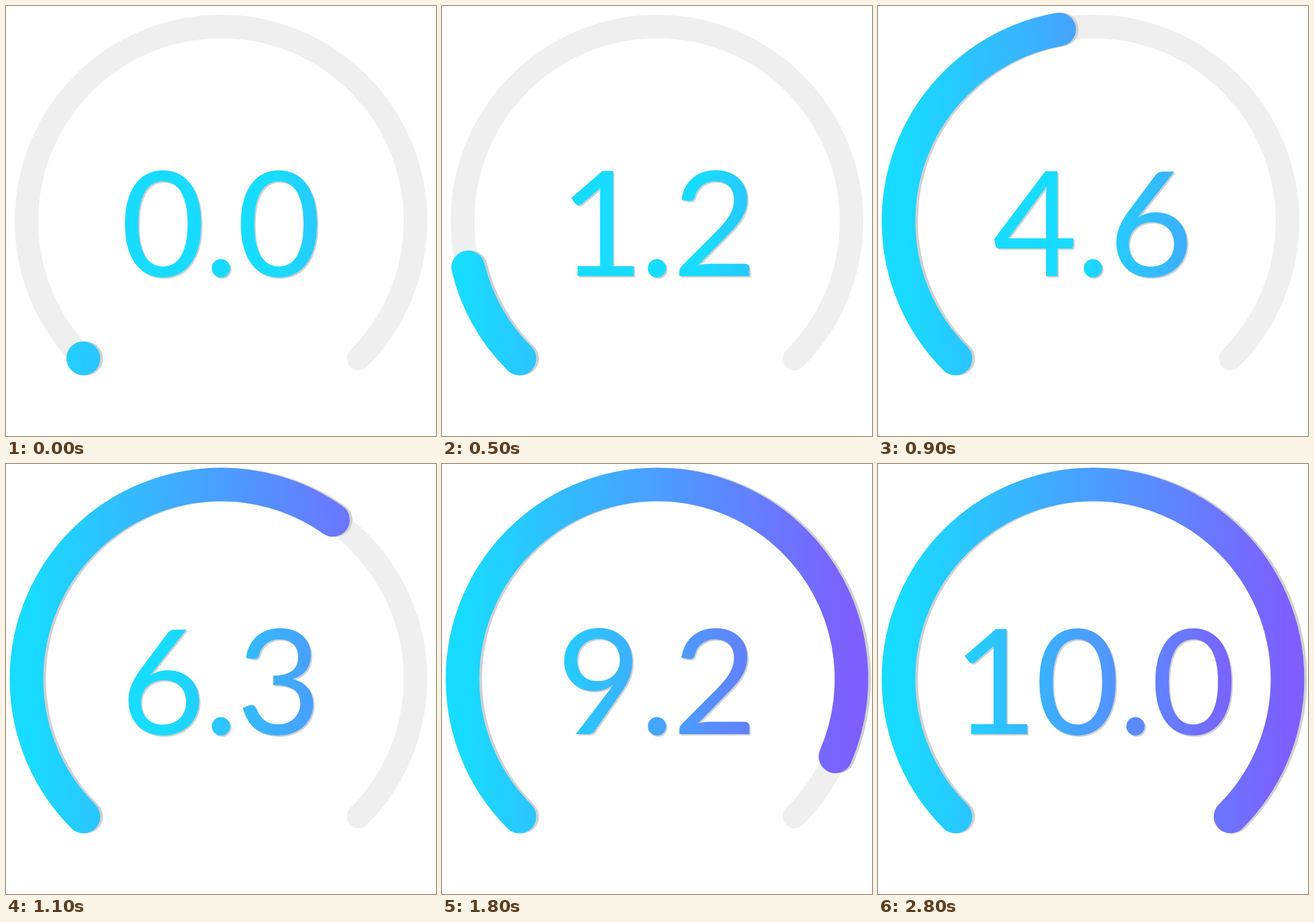
Write an HTML page with a canvas that moves like this. It is 640 px wide and 640 px high and loops after 3.9 s.

```html
<!DOCTYPE html>
<html lang="en">
<head>
<meta charset="utf-8">
<title>Score gauge</title>
<style>
  html, body { margin: 0; width: 100%; height: 100%; overflow: hidden; background: #fff; }
  canvas { display: block; width: 100vmin; height: 100vmin; }
</style>
</head>
<body>
<canvas id="stage" width="640" height="640"></canvas>
<script>
const ctx = document.getElementById('stage').getContext('2d');
const LOOP = 3900, STEP = 100, RISE = 2700;
const CENTER = 320, RADIUS = 289.5;
const START = Math.PI * 0.75, SWEEP = Math.PI * 1.5;
const SHADOW = '#d0d0d0';
const SIZE = 218, BASELINE = 402;
const DIGIT = 0.58 * SIZE, DOT = 0.212 * SIZE, ONE_SHIFT = 0.018 * SIZE;

// cubic-bezier(x1, 0, x2, 1)
function ease(x, x1 = 0.39, x2 = 0.205) {
  if (x <= 0) return 0;
  if (x >= 1) return 1;
  let lo = 0, hi = 1;
  for (let i = 0; i < 30; i++) {
    const s = (lo + hi) / 2, r = 1 - s;
    if (3 * r * s * (r * x1 + s * x2) + s * s * s < x) lo = s;
    else hi = s;
  }
  return lo * lo * (3 - 2 * lo);
}

function blend(from, to) {
  const g = ctx.createLinearGradient(from, 0, to, 0);
  g.addColorStop(0, '#18dcff');
  g.addColorStop(1, '#7d5fff');
  return g;
}

function arc(portion, width, paint, dx = 0) {
  ctx.beginPath();
  ctx.arc(CENTER + dx, CENTER, RADIUS, START, START + SWEEP * Math.max(portion, 0.0005));
  ctx.lineWidth = width;
  ctx.strokeStyle = paint;
  ctx.stroke();
}

// Each character sits in the middle of its own cell.
function label(text, paint, offset = 0) {
  ctx.fillStyle = paint;
  let x = CENTER + offset - ((text.length - 1) * DIGIT + DOT) / 2;
  for (const c of text) {
    const cell = c === '.' ? DOT : DIGIT;
    const shift = c === '1' ? ONE_SHIFT : 0;
    ctx.fillText(c, x + cell / 2 + shift, BASELINE + offset);
    x += cell;
  }
}

function draw(time) {
  const t = Math.floor((time % LOOP) / STEP) * STEP;
  const p = ease(t / RISE);
  ctx.fillStyle = '#fff';
  ctx.fillRect(0, 0, 640, 640);

  ctx.lineCap = 'round';
  arc(1, 35, '#efefef');
  arc(p, 50, SHADOW, 4);
  arc(p, 50, blend(CENTER - RADIUS, CENTER + RADIUS));

  const score = (Math.round(p * 100) / 10).toFixed(1);
  const left = 400 - 310 * Math.pow(p, 1.4);
  ctx.font = SIZE + 'px Lato, sans-serif';
  ctx.textAlign = 'center';
  label(score, SHADOW, 2);
  label(score, blend(left, left + 450));
}

const begin = performance.now();
function tick() {
  draw(performance.now() - begin);
  requestAnimationFrame(tick);
}
tick();
</script>
</body>
</html>
```
